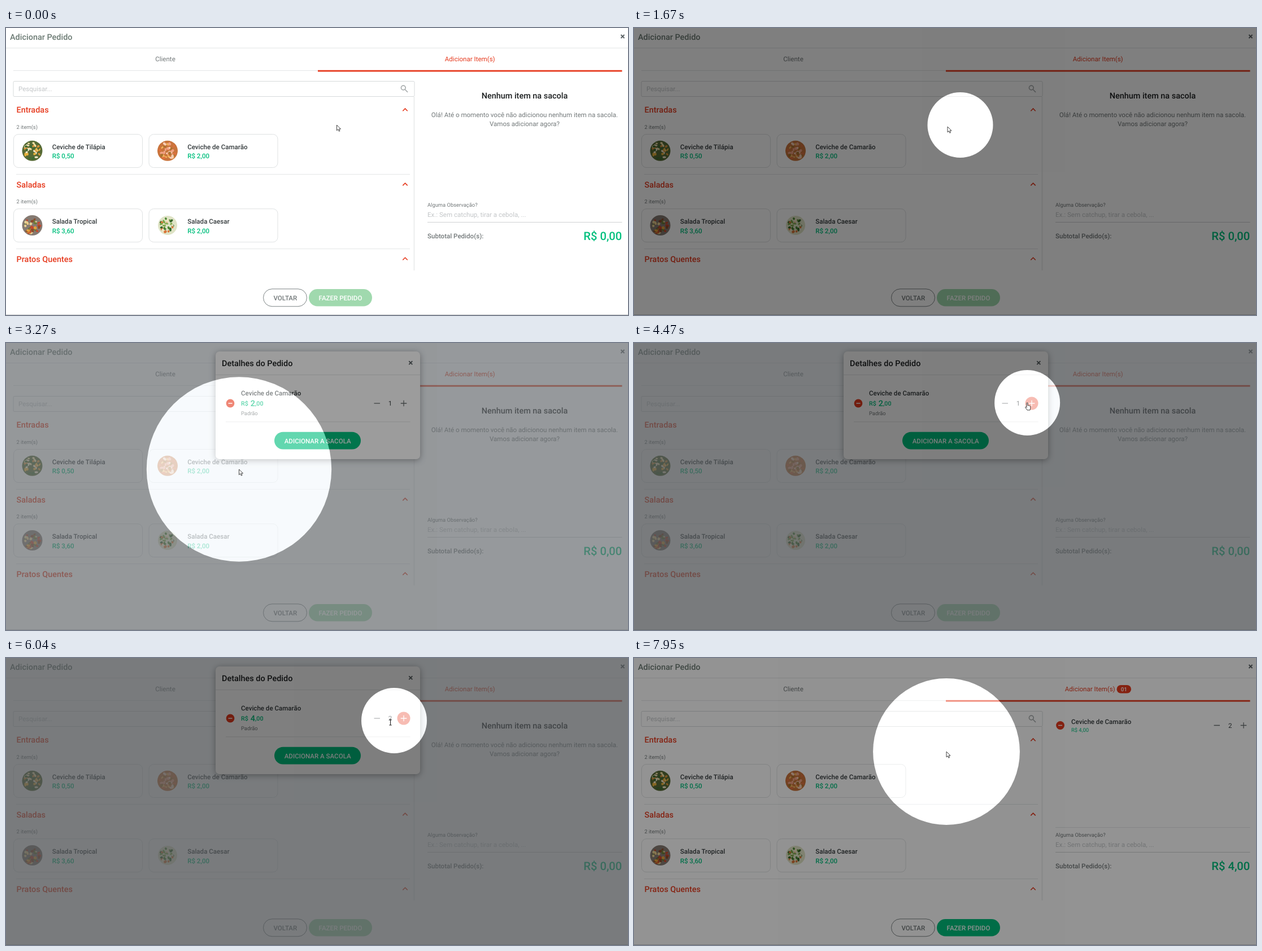
These frames come from a looping animation (1101 by 509 pixels, 8 s). An HTML page:

```html
<!DOCTYPE html>
<html lang="pt-BR">
<head>
<meta charset="utf-8">
<title>Adicionar Pedido</title>
<style>
  html, body { margin: 0; width: 100%; height: 100%; overflow: hidden; background: #fff; }
  svg { display: block; width: 1101px; height: 509px; }
  text { font: 400 11.55px Roboto, sans-serif; fill: #73797a; text-rendering: geometricPrecision; }
  .m { font-weight: 500; }
  .big { font-size: 14.44px; font-weight: 500; }
  .small { font-size: 9.39px; }
  .dark { fill: #343a3c; }
  .black { fill: #1c1f20; }
  .hint { fill: #c3c6c8; }
  .red { fill: #e63a1e; }
  .green { fill: #00bf7d; }
  .white { fill: #fff; }
  .mid { text-anchor: middle; }
  .line { stroke: #e4e6e7; fill: none; }
  .icon { stroke: #6b7072; stroke-width: 1.3; fill: none; }
  .chevron { stroke: #e63a1e; stroke-width: 1.6; fill: none; }
  .close { stroke: #5c6366; stroke-width: 1.9; fill: none; }
</style>
</head>
<body>
<svg viewBox="0 0 1101 509">
  <rect width="1101" height="509" fill="#fff"/>

  <text class="big" x="7" y="20.5" style="fill:#6b7a73">Adicionar Pedido</text>
  <path class="close" d="M1088.5 12l6 6m0-6l-6 6"/>
  <path class="line" d="M0 35.5H1101M13 75.5H552"/>
  <text class="mid" x="282" y="59">Cliente</text>
  <rect class="red" x="552" y="74.7" width="538.5" height="2.8"/>
  <text id="tab" class="red" y="59">Adicionar Item(s)</text>

  <path d="M722.5 122V430" stroke="#eceeee" stroke-width="2"/>
  <rect x="13" y="94.5" width="710" height="27" rx="2" fill="#fff" stroke="#d7dadb"/>
  <text class="hint" x="22" y="112">Pesquisar...</text>
  <g stroke="#a9adae" stroke-width="1.7" fill="none"><circle cx="703.3" cy="106" r="3.9"/><path d="M706.2 109l4.8 4.8"/></g>
  <g id="menu"></g>

  <g id="emptyBag">
    <text class="big black mid" x="918" y="125.3">Nenhum item na sacola</text>
    <text class="mid" x="918" y="157.8">Olá! Até o momento você não adicionou nenhum item na sacola.</text>
    <text class="mid" x="918" y="174">Vamos adicionar agora?</text>
  </g>
  <g id="fullBag">
    <rect class="red" x="854.5" y="48" width="25.5" height="14.5" rx="7.2"/>
    <text class="m white mid" x="867.3" y="58.8" style="font-size:9.8px">01</text>
    <circle class="red" cx="754.5" cy="119.5" r="7.4"/>
    <path d="M751 119.5h7" stroke="#fff" stroke-width="1.5"/>
    <text class="m dark" x="774" y="116.8">Ceviche de Camarão</text>
    <text class="small green" x="774" y="131">R$ 4,00</text>
    <path class="icon" d="M1026.5 119.5h10.5M1073.7 119.5h10.6M1079 114.2v10.6"/>
    <text class="mid dark" x="1055.3" y="123.6">2</text>
    <path class="line" d="M746 300.5H1090.5"/>
  </g>
  <text class="small" x="746" y="317.3">Alguma Observação?</text>
  <text class="hint" x="746" y="334.5">Ex.: Sem catchup, tirar a cebola, ...</text>
  <path d="M746 344.5H1090.5" stroke="#cfd2d3"/>
  <text class="m" x="746" y="373">Subtotal Pedido(s):</text>
  <text id="subtotal" class="m green" x="1090.3" y="376" text-anchor="end" style="font-size:20.2px"></text>

  <rect x="455.5" y="462.8" width="77" height="31" rx="15.5" fill="#fff" stroke="#7d8485"/>
  <text class="m mid" x="494.3" y="482.6">VOLTAR</text>
  <rect id="order" x="536" y="463" width="112" height="30.6" rx="15.3"/>
  <text class="m white mid" x="592" y="482.6">FAZER PEDIDO</text>
  <path d="M0 508.5H1101" stroke="#c9cccd"/>

  <g id="modal">
    <rect width="1101" height="509" fill="#e8f2fa" opacity=".5"/>
    <rect x="371" y="15" width="362" height="191" rx="7" fill="#fff" style="filter:drop-shadow(0 2px 6px #0005)"/>
    <text class="big black" x="382" y="40.6">Detalhes do Pedido</text>
    <path class="close" d="M713.3 32.2l6 6m0-6l-6 6"/>
    <path class="line" d="M371 56.5H733M389 139.8H715.5"/>
    <circle class="red" cx="397" cy="107" r="7.4"/>
    <path d="M393.5 107h7" stroke="#fff" stroke-width="1.5"/>
    <text class="m dark" x="416" y="93.4">Ceviche de Camarão</text>
    <g style="--s:10.7px">
      <text class="m green" x="416" y="111.3" style="font-size:var(--s)">R$</text>
      <text id="price" class="big green" x="432.7" y="112"></text>
      <text class="m green" x="441" y="111.3" style="font-size:var(--s)">,00</text>
    </g>
    <text class="small" x="416" y="128">Padrão</text>
    <path class="icon" d="M651.5 107h10.5"/>
    <text id="amount" class="mid dark" x="680" y="111.2"></text>
    <circle id="plusDisc" cx="704" cy="107" r="11.5" fill="#ef7967"/>
    <path id="plus" class="icon" d="M698.7 107h10.6M704 101.7v10.6"/>
    <rect class="green" x="475" y="157.7" width="153" height="30.8" rx="15.4"/>
    <text class="m white mid" x="551.7" y="177.5">ADICIONAR A SACOLA</text>
  </g>

  <g id="spotlight">
    <rect width="1101" height="509"/>
    <circle id="beam" fill="#fff"/>
  </g>

  <g id="cursor" fill="#fff" stroke="#222" stroke-width=".85" stroke-linejoin="round">
    <path id="arrow" d="M0 0V9.8L2.3 7.7 3.9 11.2 5.5 10.5 4 7.1H7Z"/>
    <path id="hand" d="M-1 .9a1 1 0 0 1 2 0V5l1.2-.3 1.3.6 1.2.1 1 .8V9.5L5 13H0L-3.2 8.6c-.6-1.2.5-1.8 1.3-1L-1 8.5Z"/>
    <path id="beamText" d="M-2.2-5H2.2M-2.2 5H2.2M0-5V5" stroke-width="1.1"/>
  </g>
</svg>

<script>
const $ = id => document.getElementById(id);
const LOOP = 8000, FADE = 500, RADIUS = 58, ZOOM = 9, LAG = 60;

// --- menu -----------------------------------------------------------------
function random(seed) {
  return () => (seed = (seed * 16807) % 2147483647) / 2147483647;
}

function dish(x, y, { base, bits, size = 18, seed }) {
  const rnd = random(seed);
  let out = `<circle cx="${x}" cy="${y}" r="${size}" fill="${base}"/>`;
  for (let i = 0; i < 34; i++) {
    const angle = rnd() * 2 * Math.PI, dist = Math.sqrt(rnd()) * (size - 3.5);
    const bx = x + dist * Math.cos(angle), by = y + dist * Math.sin(angle);
    out += `<ellipse rx="${1.6 + rnd() * 2}" ry="${1.2 + rnd() * 1.3}" fill="${bits[i % bits.length]}"
      transform="translate(${bx} ${by}) rotate(${rnd() * 180})"/>`;
  }
  return out;
}

function card(x, y, { name, price, photo }) {
  return `<rect x="${x}" y="${y + .5}" width="228" height="59" rx="8.5" fill="#fff" stroke="#dfe2e3"/>
    ${dish(x + 33, y + 29.8, photo)}
    <text class="m dark" x="${x + 68.2}" y="${y + 26.6}">${name}</text>
    <text class="m green" x="${x + 68.2}" y="${y + 43.4}">R$ ${price}</text>`;
}

function section(y, title, cards = []) {
  let out = `<text class="big red" x="18.5" y="${y + 5.3}">${title}</text>
    <path class="chevron" d="M702.3 ${y + 2.2}l4.2-4.2 4.2 4.2"/>`;
  if (cards.length) {
    out += `<text class="small" x="18.5" y="${y + 33.6}">${cards.length} item(s)</text>
      <path class="line" d="M18 ${y + 114.5}H715"/>`;
  }
  return out + cards.map((c, i) => card(13.5 + i * 239.5, y + 43, c)).join('');
}

$('menu').innerHTML =
  section(145, 'Entradas', [
    { name: 'Ceviche de Tilápia', price: '0,50',
      photo: { base: '#566a35', bits: ['#e9b23c', '#f1dfa4', '#3f6b33', '#d9933a', '#f5e8c8'], seed: 71 } },
    { name: 'Ceviche de Camarão', price: '2,00',
      photo: { base: '#c9743c', bits: ['#f0a184', '#f6cdb4', '#e0703f', '#a8742f', '#f3b45e'], seed: 512 } },
  ]) +
  section(277.2, 'Saladas', [
    { name: 'Salada Tropical', price: '3,60',
      photo: { base: '#857a72', bits: ['#c8472c', '#e2a13b', '#8b4a2a', '#e8cf92', '#6c7a38'], seed: 933 } },
    { name: 'Salada Caesar', price: '2,00',
      photo: { base: '#dfe3c6', bits: ['#4f8a35', '#f0e6c4', '#d9763a', '#7da84a', '#35662b'], size: 17, seed: 2048 } },
  ]) +
  section(409.3, 'Pratos Quentes');

// --- timing ---------------------------------------------------------------
// Bursts of evenly spaced refreshes: first, last, count. The picture rests between them.
const BURSTS = [
  [840, 1330, 8], [1670, 2420, 12], [2480, 2650, 4], [3120, 3880, 12], [3950, 4470, 9],
  [4620, 5030, 7], [5340, 6100, 11], [6170, 6900, 12], [6980, 7230, 4], [7800, 7950, 3],
];
const SPOTS = [[820, 1960], [3091, 4575], [5318, 6440], [7747, Infinity]];
const PATH = [
  [1590, 585.5, 172], [1610, 577.5, 172], [1670, 555, 175], [1740, 508, 190], [1810, 460, 208],
  [1880, 425, 220], [1950, 412.5, 224], [3620, 412.5, 224], [3820, 533, 156], [4000, 620, 122],
  [4200, 675, 108], [4340, 697, 105], [4420, 696, 106], [5880, 696, 106], [5964, 687, 111],
  [6024, 680.5, 114], [6100, 665, 122], [6200, 630, 138], [6320, 580, 158], [6420, 553, 166],
];
const HAND = [[1850, 2480], [4300, 5930], [6310, 7100]];
const TEXT_BEAM = [[5960, 6080]];

const clamp = v => Math.min(1, Math.max(0, v));
const within = (ranges, t) => ranges.some(([a, b]) => t >= a && t < b);

function refreshTime(t) {
  const burst = BURSTS.findLast(([first]) => first <= t);
  if (!burst) return 0;
  const [first, last, count] = burst, gap = (last - first) / (count - 1);
  return first + gap * Math.min(count - 1, Math.floor((t - first) / gap + 1e-6));
}

// cubic-bezier(.41, .52, 0, .94)
function ease(x) {
  if (x <= 0 || x >= 1) return clamp(x);
  let lo = 0, hi = 1, u;
  for (let i = 0; i < 24; i++) {
    u = (lo + hi) / 2;
    if (1.23 * u * (1 - u) ** 2 + u ** 3 < x) lo = u; else hi = u;
  }
  return 1.56 * u * (1 - u) ** 2 + 2.82 * u * u * (1 - u) + u ** 3;
}

function pointer(t) {
  const i = PATH.findIndex(([time]) => time > t);
  if (i === 0) return PATH[0].slice(1);
  if (i < 0) return PATH.at(-1).slice(1);
  const [t0, x0, y0] = PATH[i - 1], [t1, x1, y1] = PATH[i], k = (t - t0) / (t1 - t0);
  return [x0 + (x1 - x0) * k, y0 + (y1 - y0) * k];
}

function spotlight(t) {
  const spot = SPOTS.findLast(([start]) => start <= t);
  return spot ? ease((t - spot[0]) / FADE) - ease((t - spot[1]) / FADE) : 0;
}

// --- drawing --------------------------------------------------------------
const set = (id, attrs) => { for (const k in attrs) $(id).setAttribute(k, attrs[k]); };
const show = (id, on) => { $(id).style.display = on ? '' : 'none'; };
const write = (id, value) => { if ($(id).textContent !== value) $(id).textContent = value; };

function draw(t) {
  const added = t >= 6980, doubled = t >= 4680, hovered = t >= 4300;

  show('emptyBag', !added);
  show('fullBag', added);
  set('tab', { x: added ? 762.8 : 776.8 });
  set('order', { fill: added ? '#00bf7d' : '#a0d9ae' });
  write('subtotal', added ? 'R$ 4,00' : 'R$ 0,00');

  const modal = clamp((t - 2450) / 200) - clamp((t - 6930) / 250);
  show('modal', modal > 0);
  set('modal', { opacity: modal });
  write('price', doubled ? '4' : '2');
  write('amount', doubled ? '2' : '1');
  show('plusDisc', hovered);
  $('plus').style.stroke = hovered ? '#fff' : '';

  const p = spotlight(t), [bx, by] = pointer(t - LAG), [cx, cy] = pointer(t);
  set('spotlight', { opacity: p / 2 });
  set('beam', { cx: bx, cy: by, r: RADIUS * (1 + (ZOOM - 1) * (1 - p)) });

  const hand = within(HAND, t), textBeam = within(TEXT_BEAM, t);
  set('cursor', { transform: `translate(${cx} ${cy})` });
  show('hand', hand);
  show('beamText', textBeam);
  show('arrow', !hand && !textBeam);
}

const start = performance.now();
function tick() {
  draw(refreshTime((performance.now() - start) % LOOP));
  requestAnimationFrame(tick);
}
tick();
</script>
</body>
</html>
```
